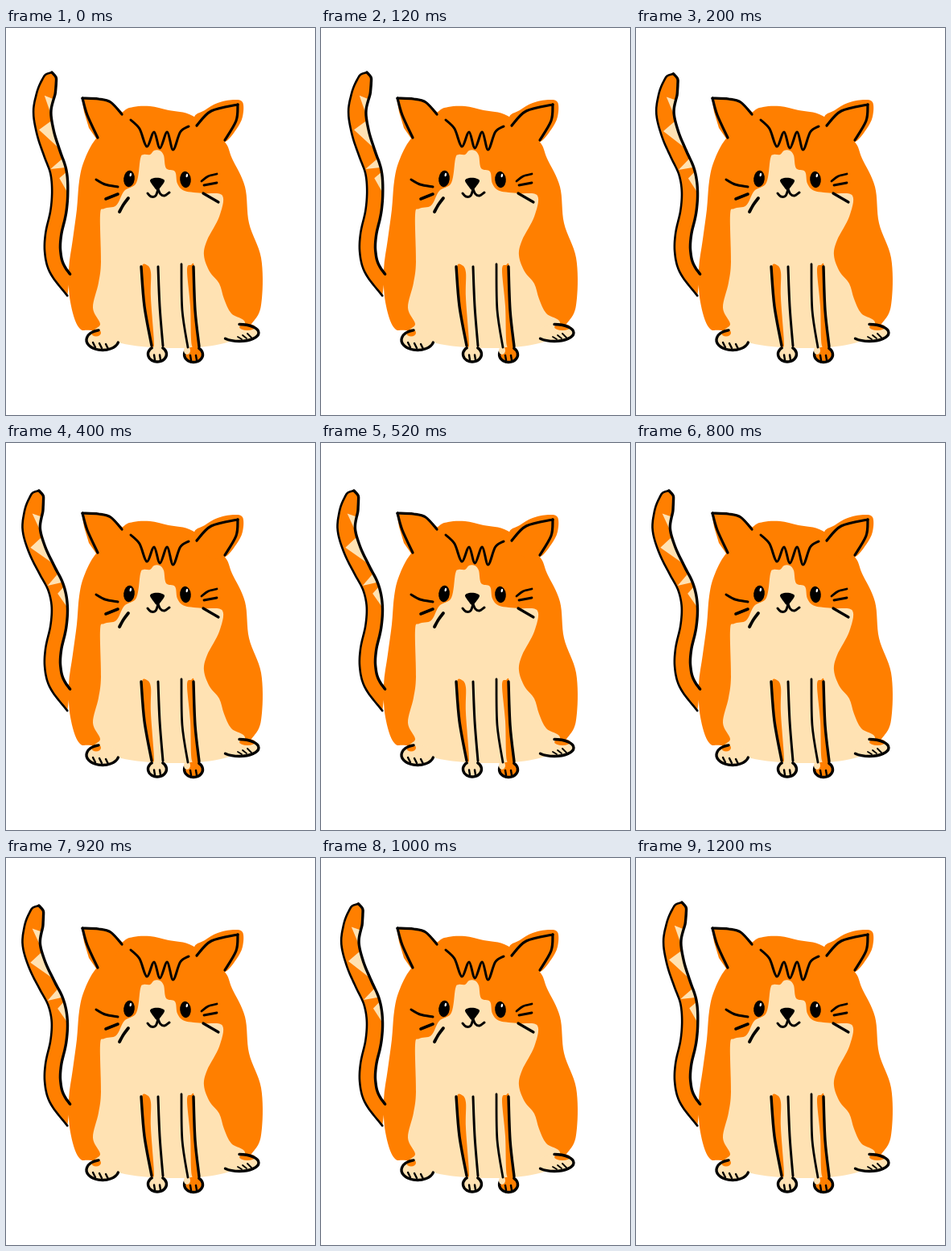
Animation, 384 px wide and 480 px high, one loop 1400 ms. Source, as an HTML page with a canvas:

```html
<!DOCTYPE html>
<html lang="en">
<head>
<meta charset="utf-8">
<title>Cat wagging its tail</title>
<style>
html, body { margin: 0; width: 100%; height: 100%; overflow: hidden; background: #fff; }
canvas { display: block; width: 384px; height: 480px; }
</style>
</head>
<body>
<canvas id="stage" width="384" height="480"></canvas>
<script>
const ctx = document.getElementById('stage').getContext('2d');
const ORANGE = '#ff7f00', CREAM = '#ffe2b3', INK = '#000';
const STEP = 200, STEPS = 7;
const SWING = [0, 0.44, 0.67, 1];

const pairs = list => list.flatMap((v, i) => i % 2 ? [] : [[v, list[i + 1]]]);
const clamp = v => Math.max(0, Math.min(1, v));

// Smooth curve through points.
function trace(p, closed) {
  const n = p.length;
  const at = i => p[closed ? (i + n) % n : Math.max(0, Math.min(n - 1, i))];
  ctx.beginPath();
  ctx.moveTo(...p[0]);
  for (let i = 0; i < (closed ? n : n - 1); i++) {
    const [a, b, c, d] = [at(i - 1), at(i), at(i + 1), at(i + 2)];
    ctx.bezierCurveTo(
      b[0] + (c[0] - a[0]) / 6, b[1] + (c[1] - a[1]) / 6,
      c[0] - (d[0] - b[0]) / 6, c[1] - (d[1] - b[1]) / 6, c[0], c[1]);
  }
}
function paint(color) {
  ctx.fillStyle = color;
  ctx.fill();
}
function ink(width) {
  ctx.lineWidth = width;
  ctx.strokeStyle = INK;
  ctx.stroke();
}
function blob(color, ...list) {
  trace(pairs(list), true);
  paint(color);
}
function poly(color, points) {
  ctx.beginPath();
  points.forEach(p => ctx.lineTo(...p));
  paint(color);
}
function line(width, ...list) {
  trace(pairs(list), false);
  ink(width);
}
function oval(color, x, y, rx, ry, turn = 0) {
  ctx.beginPath();
  ctx.ellipse(x, y, rx, ry, turn, 0, Math.PI * 2);
  paint(color);
}
function arc(width, x, y, rx, ry, from, to) {
  ctx.beginPath();
  ctx.ellipse(x, y, rx, ry, 0, from * Math.PI, to * Math.PI);
  ink(width);
}

// Middle of the resting tail, from tip to root.
const SPINE = pairs([57,55, 50.5,78, 45,103, 49,130, 57,155, 65,178, 67,202,
  65,228, 59,255, 58,278, 64,300, 84,326]);
const ROOT = SPINE.length - 1;

// Cream marks: start and end on the right edge, then a point further in.
const MARKS = [
  { from: 1.3, to: 2.2, inner: 1.25, side: -0.1 },
  { from: 2.5, to: 3.9, inner: 2.8, side: -0.65 },
  { from: 4.45, to: 4.9, inner: 4.75, side: -0.85 },
  { from: 5.1, to: 6.1, inner: 5.35, side: 0 }
];

// The tail bends more towards its tip.
function bend([x, y], k) {
  const w = Math.sin(clamp((210 - y) / 155) * Math.PI / 2) ** 1.4;
  return [x - 24 * k * w, y + 9 * k * k * w];
}
function makeTail(k) {
  const p = SPINE.map(q => bend(q, k));
  const at = i => p[Math.max(0, Math.min(ROOT, i))];
  const middle = t => {
    const i = Math.min(ROOT - 1, Math.floor(t)), u = t - i;
    const [a, b, c, d] = [at(i - 1), at(i), at(i + 1), at(i + 2)];
    return [0, 1].map(j => b[j] + u / 2 * (c[j] - a[j]
      + u * (2 * a[j] - 5 * b[j] + 4 * c[j] - d[j]
      + u * (3 * (b[j] - c[j]) + d[j] - a[j]))));
  };
  const point = (t, side) => {
    const [x, y] = middle(t);
    const [x0, y0] = middle(Math.max(0, t - 0.05));
    const [x1, y1] = middle(Math.min(ROOT, t + 0.05));
    const len = Math.hypot(x1 - x0, y1 - y0);
    const half = (11.5 - 1.7 * clamp(t / 6)) * clamp(t) ** 0.4 * side;
    return [x + (y1 - y0) / len * half, y - (x1 - x0) / len * half];
  };
  const edge = (from, to, side) =>
    Array.from({ length: 41 }, (_, i) => point(from + (to - from) * i / 40, side));
  return { point, edge };
}
function drawTail(k) {
  const { point, edge } = makeTail(k);
  const left = edge(0, ROOT, -1), right = edge(0, ROOT - 0.6, 1);
  poly(ORANGE, [...left, ...right.slice().reverse()]);
  MARKS.forEach(m => poly(CREAM, [...edge(m.from, m.to, 1), point(m.inner, m.side)]));
  trace(left);
  ink(2.6);
  trace(right);
  ink(3.4);
}

function drawBody() {
  blob(ORANGE, 112,137, 97,165, 91,190, 88,225, 83,262, 78,300, 80,340, 91,372,
    111,376, 180,392, 275,387, 309,362, 318,335, 317,285, 302,242, 297,197,
    281,162, 270,139, 232,109, 202,102, 179,97, 158,98, 144,105);
  poly(ORANGE, pairs([94,86, 115,87, 130,91, 146,106, 125,137, 112,137, 103,124, 97,104]));
  blob(ORANGE, 234,112, 247,102, 263,93, 282,89, 294,92, 294,110, 286,126, 271,142, 250,140);
  blob(CREAM, 167,162, 171,157, 179,157, 184,152, 191,152, 196,158, 199,174, 210,178,
    213,193, 222,202, 246,205, 269,208, 265,234, 250,263, 246,282, 253,302,
    265,317, 271,336, 280,354, 297,365, 285,386, 240,396, 180,396, 140,390,
    110,377, 117,367, 108,347, 115,316, 118,290, 117,232, 122,224, 137,220,
    147,202, 162,192);
}

function drawHead() {
  line(3.2, 144,107, 130,92, 115,88, 95,87);
  line(3.2, 95,87, 101,108, 114,136);
  line(3.2, 237,121, 255,103, 288,95);
  line(3.2, 288,95, 286,115, 272,139);

  const hair = [155,114, 166,125];
  for (let i = 0; i < 3; i++) {
    const x = 175 + 16.3 * i;
    hair.push(x, 147 + 2 * i, x + 9, 129);
  }
  line(3, ...hair, 227,122);

  [[153, 187, 0.12], [223, 188, -0.08]].forEach(([x, y, turn]) => {
    oval(INK, x, y, 6.8, 10.2, turn);
    oval('#fff', x + 1.8, y - 5, 1.2, 2.4, 0.2);
  });
  blob(INK, 179,189, 184,186, 191,186, 197,189, 194,195, 188,201, 183,196);
  line(3, 176,205, 180,209, 186,208, 189,200);
  line(3, 189,200, 192,206, 197,208, 203,204);

  line(3, 112,188, 123,194, 139,197);
  line(3.6, 124,212, 139,206);
  line(3.8, 141,228, 146,219, 152,211);
  line(2.8, 243,190, 251,184, 262,181);
  line(2.8, 246,195, 262,192);
  line(3.2, 245,205, 264,216);
}

function frontPaw(x, y, color) {
  oval(color, x, y, 11.5, 9.5);
  arc(3.4, x, y, 11.5, 9.5, -0.3, 1.3);
  [-4, 3].forEach(dx => line(2.4, x + dx, y + 1, x + dx + 1, y + 7));
}
function drawLegs() {
  blob(ORANGE, 169,297, 175,294, 180,303, 180,335, 184,392, 179,385, 172,335);
  blob(ORANGE, 225,300, 230,294, 234,297, 236,350, 240,394, 231,394, 229,345);
  frontPaw(188, 404.5, CREAM);
  frontPaw(233, 405, ORANGE);
  oval(CREAM, 225, 400, 4, 5);
  line(3.4, 168,296, 172,345, 181,394);
  line(3, 189,296, 191,345, 195,394);
  line(2.8, 218,293, 219,350, 226,396);
  line(3.4, 233,296, 235,350, 240,395);
}

function drawBackPaws() {
  oval(CREAM, 120, 387, 19.5, 12.5);
  oval(ORANGE, 112, 378, 6, 4.5);
  arc(3.4, 120, 387, 20, 12.5, 0.08, 1.42);
  oval(CREAM, 291, 378, 22, 10);
  oval(ORANGE, 300, 371, 10, 4);
  arc(3.4, 290, 378, 24, 10.5, -0.5, 0.76);
  for (let i = 0; i < 3; i++) {
    line(2.4, 108 + 8 * i, 390 + i, 111 + 8 * i, 396 + i);
    line(1.8, 300 - 6 * i, 379 + 2 * i, 305 - 6 * i, 384 + i);
  }
}

function draw(now) {
  const step = Math.floor(now / STEP) % STEPS;
  ctx.fillStyle = '#fff';
  ctx.fillRect(0, 0, 384, 480);
  ctx.lineCap = ctx.lineJoin = 'round';
  drawBody();
  drawTail(SWING[3 - Math.abs(3 - step)]);
  drawBackPaws();
  drawLegs();
  drawHead();
}

let start;
function tick(now) {
  start ??= now;
  draw(Math.max(0, now - start));
  requestAnimationFrame(tick);
}
draw(0);
requestAnimationFrame(tick);
</script>
</body>
</html>
```
